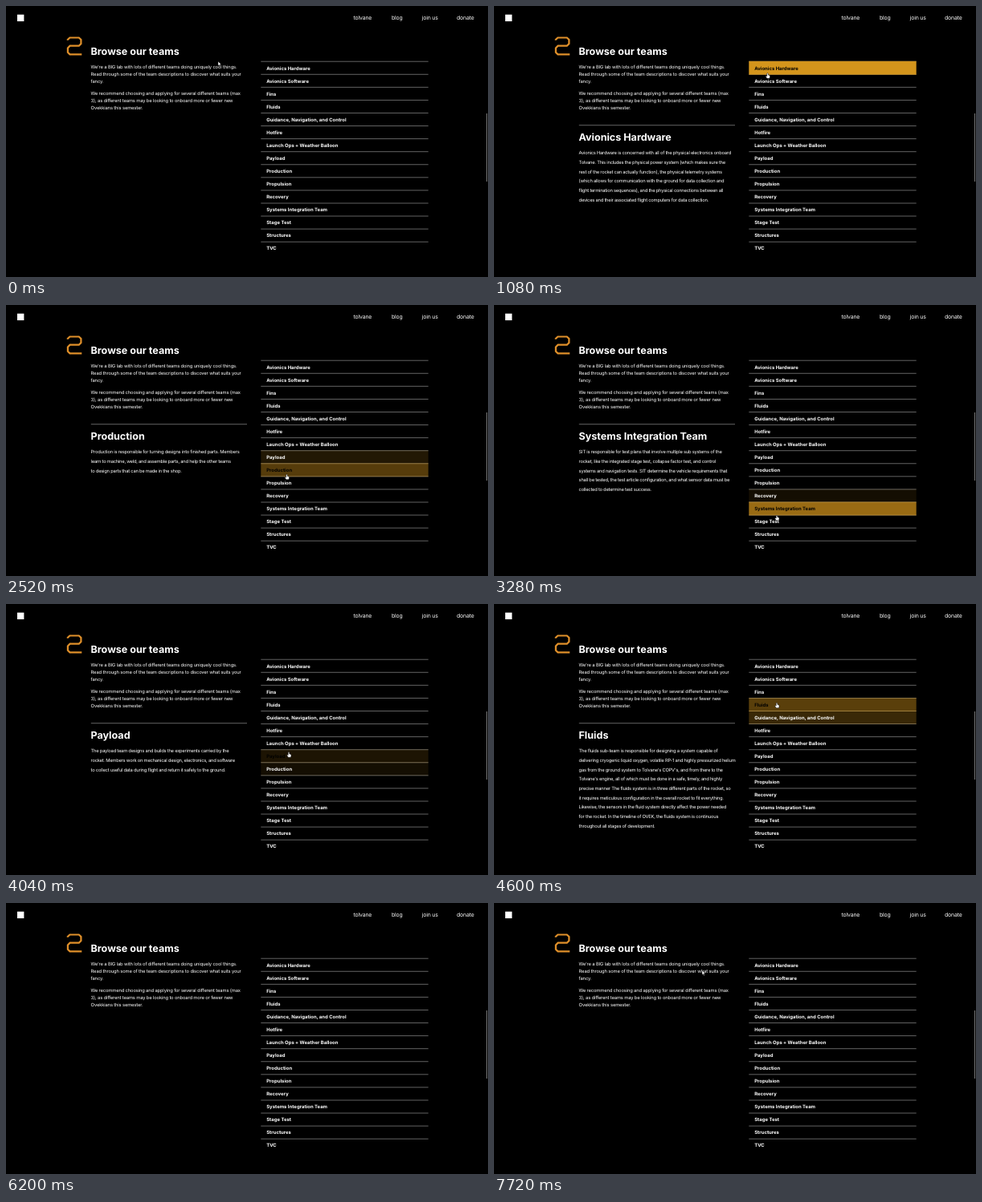
Animation of 600 by 338 pixels, one loop 7920 ms. Source, as an HTML page:

```html
<!DOCTYPE html>
<html lang="en">
<head>
<meta charset="utf-8">
<title>Browse our teams</title>
<style>
  html, body { margin: 0; width: 100%; height: 100%; overflow: hidden; background: #000; }
  svg { display: block; }
  text { font-family: Inter, sans-serif; fill: #fff; text-rendering: geometricPrecision; white-space: pre; }
  .nav { font-size: 6.9px; letter-spacing: -.16px; }
  .title { font-size: 12.55px; font-weight: 700; }
  .intro { font-size: 5.8px; letter-spacing: -.14px; }
  .info { font-size: 5.8px; letter-spacing: -.24px; }
  .row { font-size: 5.96px; font-weight: 700; }
  .rule { stroke: #858585; stroke-width: .75; }
  .cursor { fill: #fff; stroke: #000; stroke-width: .5; stroke-linejoin: round; }
</style>
</head>
<body>
<svg id="stage" width="600" height="338" viewBox="0 0 600 338"></svg>
<script>
const LOOP = 7920, TOP = 69.2, STEP = 16.07, FADE_IN = 300, FADE_OUT = 240;

const teams = [
  ['Avionics Hardware', `Avionics Hardware is concerned with all of the physical electronics onboard
Tolvane. This includes the physical power system (which makes sure the
rest of the rocket can actually function), the physical telemetry systems
(which allows for communication with the ground for data collection and
flight termination sequences), and the physical connections between all
devices and their associated flight computers for data collection.`],
  ['Avionics Software', `Avionics Software writes the code that runs onboard the rocket and on
the ground. This includes the flight computers, sensor drivers, and the
telemetry link, as well as the tools used to view and store flight data.
Members work closely with the hardware team to test every system
before launch.`],
  ['Fins', `The fins team is responsible for the design, analysis, and manufacturing
of the fins of the rocket. This includes stability and flutter studies, and
building composite parts that can survive the loads of flight.`],
  ['Fluids', `The fluids sub-team is responsible for designing a system capable of
delivering cryogenic liquid oxygen, volatile RP-1 and highly pressurized helium
gas from the ground system to Tolvane's COPV's, and from there to the
Tolvane's engine, all of which must be done in a safe, timely, and highly
precise manner The fluids system is in three different parts of the rocket, so
it requires meticulous configuration in the overall rocket to fit everything.
Likewise, the sensors in the fluid system directly affect the power needed
for the rocket. In the timeline of OVEK, the fluids system is continuous
throughout all stages of development.`],
  ['Guidance, Navigation, and Control', `The guidance team develops the models and algorithms that estimate
where the rocket is and where it is going. Members build simulations of
the flight, design filters for the sensors, and write control laws that are
tested together with the avionics and control hardware.`],
  ['Hotfire', `This stand involves integrated fluids systems, electronics hardware, and
software (RigNOTA and NUMDAK). This project also involves working with the
propulsion team and creating test plans and procedures. Working on this
projects, you will gain hands-on experience with all aspects of systems
design and manufacturing as well as test operations and be a part of a
focused team environment with a lot of communication.`],
  ['Launch Ops + Weather Balloon', `Launch Ops is responsible for everything that has to happen on the day
of launch. This includes the launch rail, the ground support equipment,
the transport of the rocket, and the procedures that keep the whole crew
safe. Members plan the site layout and lead rehearsals with every team.
The weather balloon project gathers data on wind, pressure, and
temperature at high altitude. The balloon carries a small payload with
sensors, a radio, and a camera that are built by members each semester.
The data is used to predict the path of the rocket and to decide if it is
safe to launch. Members will learn to design electronics, write software,
plan flights, and recover the payload from the field. No experience is
needed to join, only an interest in learning and working outdoors.`],
  ['Payload', `The payload team designs and builds the experiments carried by the
rocket. Members work on mechanical design, electronics, and software
to collect useful data during flight and return it safely to the ground.`],
  ['Production', `Production is responsible for turning designs into finished parts. Members
learn to machine, weld, and assemble parts, and help the other teams
to design parts that can be made in the shop.`],
  ['Propulsion', `The propulsion team designs, builds, and tests the liquid engine of the
rocket. This includes the injector, the chamber, the nozzle, and the
analysis of heat transfer and combustion needed to reach our goals.`],
  ['Recovery', `Recovery is responsible for bringing the rocket safely back to the ground.
Members design the parachutes, the deployment system, and the tests
that show the system works as intended.`],
  ['Systems Integration Team', `SIT is responsible for test plans that involve multiple sub systems of the
rocket, like the integrated stage test, collapse factor test, and control
systems and navigation tests. SIT determine the vehicle requirements that
shall be tested, the test article configuration, and what sensor data must be
collected to determine test success.`],
  ['Stage Test', `Stage Test prepares the full rocket stage for a test on the ground. Members
design the stand, plan the operations, and work with every team to show
that the vehicle is ready for flight.`],
  ['Structures', ''],
  ['TVC', '']
];

// [time, hovered row]
const hovers = [
  [760, 0], [1120, 1], [1260, 2], [1400, 3], [1550, 4], [1790, 5], [2000, 6],
  [2200, 7], [2400, 8], [2590, 9], [2760, 10], [3064, 11], [3300, 12],
  [3640, 11], [3760, 10], [3840, 9], [3920, 8], [4000, 7], [4080, 6], [4150, 5],
  [4234, 4], [4474, 3], [4760, 2], [4960, 1], [5180, 0], [5880, -1]
];

// [time, x, y] of the pointer tip
const path = [
  [0, 264, 69], [520, 264, 69], [760, 322, 75], [1080, 340.5, 83.5], [1550, 346, 134],
  [1960, 348.5, 169], [2800, 350, 232], [3280, 352, 262], [3480, 352, 270],
  [3620, 352, 262], [4234, 352, 149], [4600, 352, 123], [5180, 349, 84],
  [5320, 347, 79], [5720, 347, 79], [6000, 300, 82], [6160, 259, 84], [LOOP, 259, 84]
];

const stage = document.getElementById('stage');

function add(tag, attrs, parent = stage) {
  const el = document.createElementNS('http://www.w3.org/2000/svg', tag);
  for (const key in attrs) el.setAttribute(key, attrs[key]);
  return parent.appendChild(el);
}

function label(cls, x, y, str, parent) {
  const el = add('text', { class: cls, x, y }, parent);
  el.textContent = str;
  return el;
}

function lines(cls, str, y, gap, parent) {
  str.split('\n').forEach((s, i) => label(cls, 105.6, y + i * gap, s, parent));
}

const rule = (x1, x2, y, parent) => add('line', { class: 'rule', x1, x2, y1: y, y2: y }, parent);

// Header and intro
add('rect', { x: 14, y: 10.7, width: 8.4, height: 8.4, fill: '#fff' });
[['tolvane', 432.5], ['blog', 480], ['join us', 517.7], ['donate', 561]]
  .forEach(([s, x]) => label('nav', x, 17, s));
add('path', {
  d: 'M76.8 42.8V42L79.4 39.5H90.8L93.4 42V47.1L90.8 49.7H79.6L76.9 52.4V57.7L79.5 60.3H94.3',
  fill: 'none', stroke: '#e0902a', 'stroke-width': 2.2
});
label('title', 105.5, 61, 'Browse our teams');
lines('intro', `We're a BIG lab with lots of different teams doing uniquely cool things.
Read through some of the team descriptions to discover what suits your
fancy.`, 78.4, 8.65);
lines('intro', `We recommend choosing and applying for several different teams (max
3), as different teams may be looking to onboard more or fewer new
Ovekkians this semester.`, 111.2, 8.65);
add('rect', { x: 598, y: 134, width: 1, height: 85, fill: '#777' });

// Team list and details; a highlight covers the rules around its row
teams.forEach((_, i) => rule(317.3, 525.7, TOP + i * STEP));
const rows = teams.map(([name, text], i) => {
  const y = TOP + i * STEP;
  const fill = add('rect', { x: 317.3, y: y - .4, width: 208.4, height: STEP + .8, fill: '#d4951c' });
  const title = label('row', 324.2, y + 10.3, name);
  const info = add('g', {});
  rule(105.8, 300, 148.7, info);
  label('title', 105.5, 168, name, info);
  lines('info', text, 185.3, 11.66, info);
  return { fill, title, info };
});

const arrow = add('path', { class: 'cursor', d: 'M0 0V5.6L1.3 4.5 2.2 6.4 3.2 6 2.3 4.1H4Z' });
const hand = add('path', {
  class: 'cursor',
  d: 'M-.8 .7Q0 -.5 .8 .7V2.4L2.8 3Q3.5 4.8 2.5 6.7H-.8L-2.4 4.1Q-1.9 3 -.8 4Z'
});

function level(row, t) {
  let best = 0;
  hovers.forEach(([from, r], i) => {
    if (r !== row || t < from) return;
    const to = hovers[i + 1][0];
    const rise = Math.min(1, (Math.min(t, to) - from) / FADE_IN);
    best = Math.max(best, rise - Math.max(0, t - to) / FADE_OUT);
  });
  return best;
}

function pointer(t) {
  const i = path.findIndex(p => p[0] > t);
  const [t0, x0, y0] = path[i - 1], [t1, x1, y1] = path[i];
  const k = (t - t0) / (t1 - t0);
  return [x0 + (x1 - x0) * k, y0 + (y1 - y0) * k];
}

function show(el, on) { el.style.display = on ? '' : 'none'; }

function draw(t) {
  let active = -1;
  for (const [at, row] of hovers) if (t >= at) active = row;
  rows.forEach((r, i) => {
    r.fill.style.opacity = level(i, t);
    r.title.style.fill = i === active ? '#000' : '#fff';
    show(r.info, i === active);
  });
  const [x, y] = pointer(t);
  const visible = t < 6200 || t >= 7720;
  const inList = x > 317.5;
  show(hand, visible && inList);
  show(arrow, visible && !inList);
  for (const el of [hand, arrow]) el.setAttribute('transform', `translate(${x} ${y})`);
}

const start = performance.now();
function tick() {
  draw((performance.now() - start) % LOOP);
  requestAnimationFrame(tick);
}
tick();
</script>
</body>
</html>
```
